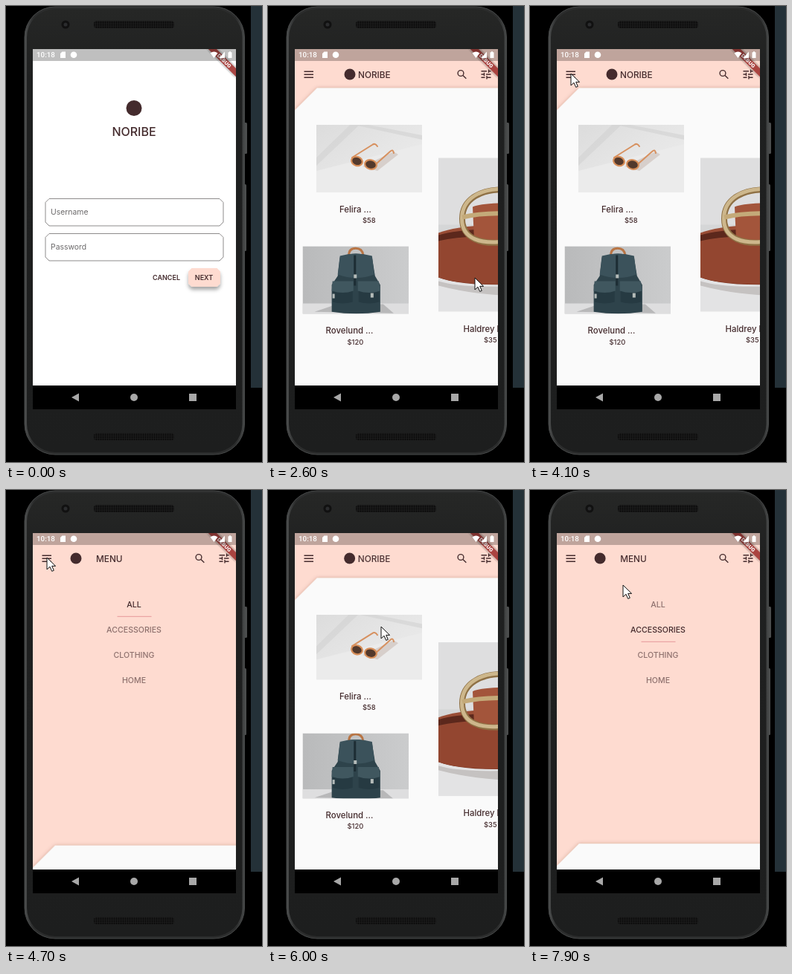
These frames come from a looping animation (344 by 614 pixels, 8 s). An HTML page:

```html
<!DOCTYPE html>
<html lang="en">
<head>
<meta charset="utf-8">
<title>Shop app demo</title>
<style>
  html, body { margin: 0; width: 100%; height: 100%; overflow: hidden; background: #000; }
  svg { display: block; }
  #stage { width: 344px; height: 614px; font-family: Inter, Roboto, sans-serif; }
  text { fill: #442b2d; font-weight: 500; }
  .mid { text-anchor: middle; }
  .brand { font-size: 11.8px; }
  .name { font-size: 11.4px; }
  .price { font-size: 9.4px; }
  .button { font-size: 9px; font-weight: 600; }
  .hint { font-size: 10.4px; font-weight: 400; fill: #6c6a6b; }
  .item { font-size: 10.6px; text-anchor: middle; }
  .icon { fill: none; stroke: #442b2d; stroke-width: 1.4; }
</style>
</head>
<body>
<svg id="stage" viewBox="0 0 344 614">
  <defs>
    <clipPath id="screen"><rect x="36" y="58" width="273" height="453"/></clipPath>
    <clipPath id="content"><path id="contentArea"/></clipPath>
    <filter id="soft" x="-20%" y="-20%" width="140%" height="140%">
      <feDropShadow dx="0" dy="0" stdDeviation="2.5" flood-color="#5a2d20" flood-opacity=".28"/>
    </filter>
    <filter id="raised" x="-30%" y="-40%" width="160%" height="200%">
      <feDropShadow dx="0" dy="4" stdDeviation="2.6" flood-opacity=".35"/>
    </filter>
    <filter id="blur" x="-30%" y="-30%" width="160%" height="160%"><feGaussianBlur stdDeviation="3"/></filter>
    <pattern id="mesh" width="3" height="3" patternUnits="userSpaceOnUse">
      <rect width="3" height="3" fill="#1a1a1a"/><circle cx="1.5" cy="1.5" r="1" fill="#070707"/>
    </pattern>
    <linearGradient id="face" x2="0" y2="1">
      <stop stop-color="#262726"/><stop offset=".15" stop-color="#1f2020"/><stop offset="1" stop-color="#1d1e1e"/>
    </linearGradient>
    <linearGradient id="rim" x2="1" y2="0">
      <stop stop-color="#4c4e4e"/><stop offset=".04" stop-color="#2c2d2d"/>
      <stop offset=".96" stop-color="#2c2d2d"/><stop offset="1" stop-color="#454747"/>
    </linearGradient>
    <linearGradient id="table" x2="1" y2="1">
      <stop stop-color="#dcdcdc"/><stop offset=".5" stop-color="#e6e6e6"/><stop offset="1" stop-color="#eeeeee"/>
    </linearGradient>
    <linearGradient id="wall" x2="1" y2="0">
      <stop stop-color="#b9babb"/><stop offset="1" stop-color="#cbcccd"/>
    </linearGradient>
    <linearGradient id="leather" x2="0" y2="1">
      <stop stop-color="#9d5038"/><stop offset="1" stop-color="#7b3522"/>
    </linearGradient>
  </defs>

  <rect width="344" height="614"/>
  <rect x="329" width="15" height="514" fill="#243138"/>

  <!-- Phone -->
  <rect x="319" y="157" width="5" height="42" rx="1.5" fill="#4b4d4d"/>
  <rect x="319" y="240" width="4" height="90" rx="1.5" fill="#4b4d4d"/>
  <rect x="25" y="1" width="295.500" height="603" rx="41" fill="url(#rim)" stroke="#474949"/>
  <rect x="28" y="4" width="289.500" height="597" rx="38" fill="url(#face)"/>
  <circle cx="80" cy="25" r="5.500" fill="#111"/><circle cx="80" cy="25" r="2.500" fill="#2b2c2e"/>
  <rect x="118" y="20" width="108" height="10" rx="4" fill="url(#mesh)"/>
  <rect x="118" y="575" width="108" height="10" rx="4" fill="url(#mesh)"/>
  <rect x="36" y="58" width="273" height="485"/>
  <g fill="#a8a8a8">
    <path d="M88 527 98 521.500V532.500Z"/><circle cx="172" cy="527" r="5"/><rect x="246" y="522" width="10" height="10"/>
  </g>

  <g clip-path="url(#screen)">
    <!-- Menu layer -->
    <rect x="36" y="58" width="273" height="453" fill="#fedbd0"/>
    <path class="icon" d="M48.500 88.200H61M48.500 92.200H61M48.500 96.200H61"/>
    <circle id="mark" cy="92" r="7.500" fill="#442b2d"/>
    <text id="shopTitle" class="brand" y="96.500">NORIBE</text>
    <text id="menuTitle" class="brand" y="96.500">MENU</text>
    <circle class="icon" cx="259" cy="90.500" r="3.900"/><path class="icon" d="M262 93.500 266.300 97.800"/>
    <path class="icon" d="M286.500 87.800H294M296.500 87.800H299.500M296.500 85.600V90M286.500 92H291M290.500 89.800V94.200M293 92H299.500M286.500 96.300H291.500M294 96.300H299.500M294 94.100V98.500"/>
    <g id="menu"></g>
    <path id="underline" stroke="#eaa4a4" stroke-width="1.300"/>

    <!-- Product sheet -->
    <path id="sheet" fill="#fafafa" filter="url(#soft)"/>
    <g clip-path="url(#content)">
      <svg id="glasses" x="65" width="142" viewBox="0 0 142 91" preserveAspectRatio="xMidYMid slice">
        <rect width="142" height="91" fill="url(#table)"/>
        <path d="M0 62 142 26V91H0Z" fill="#ebebeb"/>
        <path d="M0 44 45 0H58L0 55ZM70 0 142 14V20L50 0Z" fill="#d2d2d2" opacity=".6"/>
        <path d="M62 56 104 36 110 40 82 62Z" fill="#cfc4be" opacity=".7"/>
        <g fill="none" stroke="#d79160" stroke-width="2" stroke-linecap="round">
          <path d="M48 44 75 27Q79 24 82 29M81 52 99 36Q103 32 104 38"/>
        </g>
        <g fill="#53392c" stroke="#d78e59" stroke-width="2.200">
          <ellipse cx="54.500" cy="49" rx="7.500" ry="6" transform="rotate(18 54.500 49)"/>
          <ellipse cx="73" cy="53.500" rx="8" ry="6.200" transform="rotate(14 73 53.500)"/>
        </g>
      </svg>
      <svg id="backpack" x="46.500" width="142.500" viewBox="0 0 142 91" preserveAspectRatio="xMidYMid slice">
        <rect width="142" height="91" fill="url(#wall)"/>
        <path d="M0 77H142V91H0Z" fill="#dededf"/>
        <path d="M16 88 46 78H108L122 90Z" fill="#a8a9aa" opacity=".7"/>
        <path d="M62 12Q62 3 71 3T81 12" fill="none" stroke="#b87545" stroke-width="3"/>
        <path d="M50 15Q71 5 93 15L97 40 104 52V88Q72 93 39 88V52L47 40Z" fill="#2e434b"/>
        <path d="M50 13Q71 7 93 13L96 38Q72 47 47 38Z" fill="#3b525b"/>
        <path d="M41 50H67V75Q54 79 40 75ZM75 50H102L103 75Q89 79 75 75Z" fill="#263a42"/>
        <path d="M40 47H68V60Q54 65 39 60ZM74 47H102L104 60Q89 65 74 60Z" fill="#40575f"/>
        <path d="M70 12V53" stroke="#1d2d34" stroke-width="3"/>
        <g fill="#b4bbb9"><rect x="68.500" y="38" width="4" height="5"/><rect x="40" y="64" width="3" height="6"/><rect x="91" y="63" width="4" height="6"/></g>
      </svg>
      <svg id="belt" x="229" width="142" viewBox="0 0 142 207" preserveAspectRatio="xMidYMin slice">
        <rect width="142" height="207" fill="#d5d6d7"/>
        <path d="M0 0H142V90H0Z" fill="#dededf"/>
        <path d="M0 148H142V207H0Z" fill="#e3e3e4"/>
        <path d="M0 166Q40 178 142 170V186Q60 188 0 172Z" fill="#c5c2c1"/>
        <path d="M0 101Q40 86 142 92V168Q40 176 0 161Z" fill="url(#leather)"/>
        <path d="M0 104Q40 92 142 97V106Q40 102 0 112Z" fill="#5c281c"/>
        <path d="M0 113Q40 103 142 107V168Q40 175 0 161Z" fill="#934630"/>
        <path d="M46 66Q62 58 142 62V116Q70 118 48 110Z" fill="#a3553b"/>
        <path d="M92 43C58 41 32 55 32 82S58 118 92 113" fill="none" stroke="#8f7145" stroke-width="8"/>
        <path d="M92 42C58 40 31.500 54 31.500 82S58 117 92 112" fill="none" stroke="#cdb78c" stroke-width="5"/>
        <path d="M32 80Q58 74 92 75" fill="none" stroke="#c4aa79" stroke-width="6"/>
      </svg>
      <g id="firstLabel"><text class="name" x="96">Felira …</text><text class="price" x="127" y="14.500">$58</text></g>
      <g id="secondLabel"><text class="name" x="77.500">Rovelund …</text><text class="price" x="106.500" y="14.500">$120</text></g>
      <g id="beltLabel"><text class="name" x="262.500">Haldrey belt</text><text class="price" x="290" y="14.500">$35</text></g>
    </g>

    <!-- Login page -->
    <g id="login">
      <rect x="36" y="58" width="273" height="485" fill="#fff"/>
      <circle cx="172" cy="137.500" r="10.500" fill="#442b2d"/>
      <text class="mid" x="172" y="174.500" font-size="16">NORIBE</text>
      <g id="fields" fill="none" stroke="#8d8b8b" stroke-width="1"></g>
      <text class="hint" x="60" y="281.300">Username</text>
      <text class="hint" x="60" y="328.300">Password</text>
      <text class="button mid" x="215.500" y="368.500">CANCEL</text>
      <path id="next" fill="#fedbd0" filter="url(#raised)"/>
      <text class="button mid" x="266" y="368.500">NEXT</text>
    </g>

    <!-- System overlays -->
    <g transform="translate(309 58) rotate(45)">
      <rect x="-27" y="18.400" width="54" height="8" opacity=".4" filter="url(#blur)"/>
      <rect x="-27" y="18.400" width="54" height="7.900" fill="#a93a37" opacity=".9"/>
      <text class="mid" y="24.800" style="font-size:6.700px;font-weight:800;fill:#fff">DEBUG</text>
    </g>
    <rect x="36" y="58" width="273" height="16" opacity=".25"/>
    <g fill="#fff">
      <text x="41" y="69.300" style="font:500 9.800px Roboto,sans-serif;fill:#fff">10:18</text>
      <path d="M75.500 61.500H80V70H73V64ZM274.500 63.500Q279.500 59.500 284.500 63.500L279.500 70ZM294 61.500V70H286.500ZM298.500 62.300H300V61.300H302V62.300H303.500V70H298.500Z"/>
      <circle cx="91" cy="65.700" r="4.300"/>
    </g>
  </g>

  <path id="cursor" d="M0 0V16L4 12.300 6.700 18.400 9.300 17.300 6.700 11.400H11.600Z" fill="#fff" stroke="#111"/>
</svg>

<script>
const LOOP = 8000, STEP = 100;
const OPEN_AT = 4250, CLOSE_AT = 5748, REOPEN_AT = 7595;
const LOGIN_LEAVES = 2080, LEAVE_TIME = 300;
const el = id => document.getElementById(id);
const set = (id, attrs) => {
  for (const [key, value] of Object.entries(attrs)) el(id).setAttribute(key, value);
};
const clamp = v => Math.min(1, Math.max(0, v));
const mix = (a, b, k) => a + (b - a) * k;
const smooth = v => v * v * (3 - 2 * v);

const bevelBox = (x, y, w, h, c) =>
  `M${x + c} ${y}h${w - 2 * c}l${c} ${c}v${h - 2 * c}l${-c} ${c}h${2 * c - w}l${-c} ${-c}v${2 * c - h}Z`;

el('fields').innerHTML = [259.5, 306.5]
  .map(y => `<path d="${bevelBox(53, y, 239, 36.5, 5)}"/>`).join('');
set('next', { d: bevelBox(245, 353, 43, 25, 4.5) });

const categories = ['ALL', 'ACCESSORIES', 'CLOTHING', 'HOME'];
el('menu').innerHTML = categories
  .map((label, i) => `<text class="item" x="172" y="${158 + 34 * i}">${label}</text>`).join('');

// Time, x, y of the pointer tip
const pointer = [
  [1200, 311, 300], [1700, 280, 368], [2000, 278, 366], [2700, 278, 366],
  [3500, 55, 91], [4700, 55, 91], [5400, 154, 186], [5700, 152, 184],
  [6400, 152, 184], [7000, 67, 104], [7300, 58, 91], [7600, 58, 91], [7900, 125, 128]
];

function pointerAt(t) {
  const i = pointer.findIndex(key => key[0] > t);
  if (i < 0) return pointer[pointer.length - 1].slice(1);
  if (i === 0) return null;
  const [t0, x0, y0] = pointer[i - 1], [t1, x1, y1] = pointer[i];
  const k = smooth((t - t0) / (t1 - t0));
  return [mix(x0, x1, k), mix(y0, y1, k)];
}

// Critically damped spring: the share of the way still to go
function remaining(ms) {
  const s = Math.max(0, ms) / 1000;
  return Math.exp(-22.4 * s) * (1 + 20.4 * s);
}

function menuOpenness(t) {
  if (t < CLOSE_AT) return 1 - remaining(t - OPEN_AT);
  if (t < REOPEN_AT) return remaining(t - CLOSE_AT);
  return 1 - remaining(t - REOPEN_AT);
}

function drawTitle(open) {
  set('mark', { cx: mix(110, 94, open) });
  set('shopTitle', { x: 121 - 11 * open, opacity: clamp(1 - 2 * open) });
  set('menuTitle', { x: 121 + 17 * (1 - open), opacity: clamp(2 * open - 1) });
}

function drawMenu(selected) {
  [...el('menu').children].forEach((item, i) => item.setAttribute('opacity', i === selected ? 1 : 0.6));
  set('underline', { d: `M149.500 ${170.3 + 34 * selected}h46` });
}

function drawSheet(open) {
  const top = 110.5 + 368.5 * open;
  const lost = 337 * open;
  const imageHeight = Math.max(0.01, 91 - lost / 2);
  const second = Math.max(72, 213 - lost / 2);
  const beltTop = Math.max(48, 94 - lost);
  const place = (id, y) => set(id, { transform: `translate(0 ${top + y})` });

  set('sheet', { d: `M36 560V${top + 30}L66 ${top}H320V560Z` });
  set('contentArea', { d: `M36 ${top + 26}H309V560H36Z` });
  set('glasses', { y: top + 49.5, height: imageHeight });
  set('backpack', { y: top + second, height: imageHeight });
  set('belt', { y: top + beltTop, height: 207 });
  place('firstLabel', 49.5 + imageHeight + 26.5);
  place('secondLabel', second + imageHeight + 26.5);
  place('beltLabel', beltTop + 234);
}

function drawLogin(t) {
  const shown = 1 - clamp((t - LOGIN_LEAVES) / LEAVE_TIME);
  set('login', {
    opacity: shown ** 1.8,
    transform: `translate(0 ${121 * (1 - smooth(shown))})`,
    visibility: shown > 0 ? 'visible' : 'hidden'
  });
}

function draw(t) {
  const open = menuOpenness(t);
  const tip = pointerAt(t);
  drawTitle(open);
  drawMenu(t < CLOSE_AT ? 0 : 1);
  drawSheet(open);
  drawLogin(t);
  set('cursor', tip
    ? { transform: `translate(${tip.join(' ')})`, visibility: 'visible' }
    : { visibility: 'hidden' });
}

const start = performance.now();
function tick() {
  const t = (performance.now() - start) % LOOP;
  draw(Math.floor(t / STEP) * STEP);
  requestAnimationFrame(tick);
}
draw(0);
requestAnimationFrame(tick);
</script>
</body>
</html>
```
